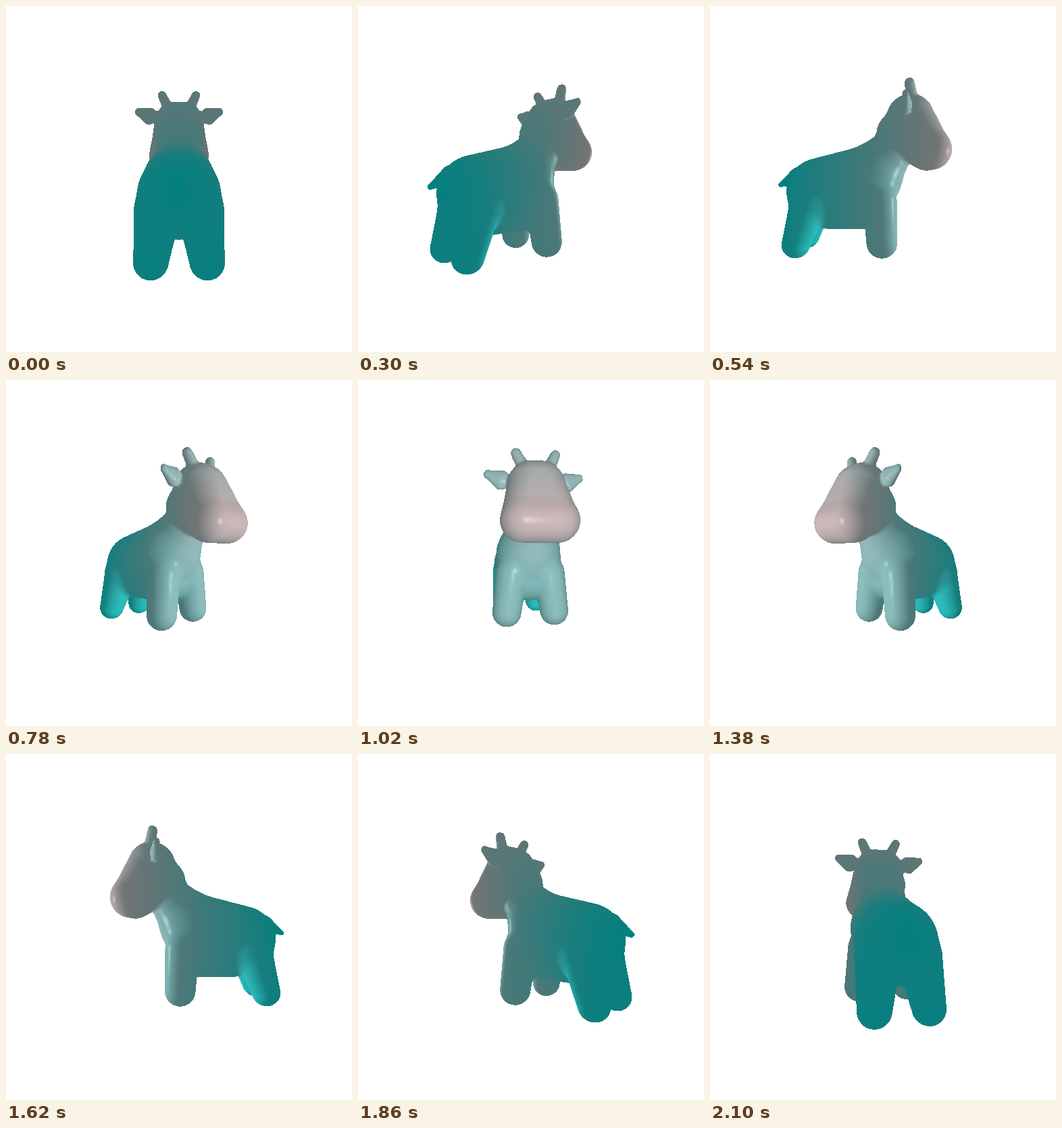
An HTML page with a canvas that plays this animation: 512x512 px, repeating every 2160 ms.

```html
<!DOCTYPE html>
<html lang="en">
<head>
<meta charset="utf-8">
<title>Turning cow</title>
<style>
  html, body { margin: 0; width: 100%; height: 100%; overflow: hidden; background: #fff; }
  canvas { display: block; width: 100vmin; height: 100vmin; }
</style>
</head>
<body>
<canvas id="stage" width="512" height="512"></canvas>
<script>
const SIZE = 512, STEP_MS = 60, STEPS = 36;
const DISTANCE = 3, FOCAL = SIZE / 2 / Math.tan(Math.PI / 6);
const LIGHT_Z = -3, FRONT_Z = -0.66, BACK_Z = 1.05;
const FRONT = [1, 0.9, 0.9], BACK = [0, 1, 1];

// The cow is a soft union of rounded cones, each spanning two balls.
// A ball may be widened sideways; only the right half is described.
const ball = (x, y, z, r, wide = 0) => ({ x, y, z, r, wide });
const cone = (a, b, blend, flat = 1) => ({ a, b, blend, flat });

const shoulders = ball(0, 0.01, 0.14, 0.325);
const rump = ball(0, -0.12, 0.62, 0.33);
const muzzle = ball(0, 0.28, -0.46, 0.182, 0.152);
const crown = ball(0, 0.6, -0.27, 0.235, 0.035);
const nape = ball(0, 0.44, -0.17, 0.235, 0.03);

const body = cone(shoulders, rump, 0);
const belly = cone(ball(0, -0.22, 0.2, 0.28), ball(0, -0.22, 0.5, 0.28), 0.05);
const hindLeg = cone(ball(0.165, -0.25, 0.7, 0.18), ball(0.205, -0.605, 0.81, 0.13), 0.06);
const frontLeg = cone(ball(0.19, -0.2, 0.03, 0.16), ball(0.24, -0.585, 0.01, 0.143), 0.07);
const tail = cone(ball(0, 0.03, 0.87, 0.07), ball(0, -0.06, 1.025, 0.025), 0.05);
const neck = cone(shoulders, ball(0, 0.36, -0.15, 0.19), 0.04);
const face = cone(crown, muzzle, 0.03);
const jaw = cone(nape, muzzle, 0.04);
const ear = cone(ball(0.32, 0.672, -0.2, 0.092), ball(0.43, 0.715, -0.2, 0.042), 0.025, 0.65);
const horn = cone(ball(0.115, 0.77, -0.28, 0.058), ball(0.183, 0.905, -0.25, 0.047), 0.02);
const cow = [body, belly, hindLeg, frontLeg, tail, neck, face, jaw, ear, horn];

const clamp01 = v => Math.max(0, Math.min(1, v));
const lerp = (a, b, t) => a + (b - a) * t;

function coneDistance({ a, b, flat }, x, y, z) {
  const bx = b.x - a.x, by = b.y - a.y, bz = b.z - a.z;
  const px = x - a.x, py = y - a.y, pz = (z - a.z) / flat;
  const t = clamp01((px * bx + py * by + pz * bz) / (bx * bx + by * by + bz * bz));
  const dx = Math.max(Math.abs(px - bx * t) - lerp(a.wide, b.wide, t), 0);
  const dy = py - by * t, dz = pz - bz * t;
  return Math.sqrt(dx * dx + dy * dy + dz * dz) - lerp(a.r, b.r, t);
}

function distance(x, y, z) {
  let d = 9;
  for (const part of cow) {
    const e = coneDistance(part, Math.abs(x), y, z);
    const overlap = Math.max(part.blend - Math.abs(d - e), 0);
    d = Math.min(d, e) - (overlap && overlap * overlap / (4 * part.blend));
  }
  return d;
}

function gradient(x, y, z) {
  const e = 0.006;
  return [
    (distance(x + e, y, z) - distance(x - e, y, z)) / (2 * e),
    (distance(x, y + e, z) - distance(x, y - e, z)) / (2 * e),
    (distance(x, y, z + e) - distance(x, y, z - e)) / (2 * e),
  ];
}

// Surface nets: one vertex per crossed cell, pulled onto the surface.
function buildMesh() {
  const h = 0.022, min = [-0.54, -0.8, -0.76], count = [50, 82, 88];
  const stride = [count[1] * count[2], count[2], 1];
  const field = new Float32Array(count[0] * stride[0]);
  const vertices = [], triangles = [], known = new Map();
  const coords = c => [Math.floor(c / stride[0]), Math.floor(c / stride[1]) % count[1], c % count[2]];

  for (let c = 0; c < field.length; c++) {
    const [i, j, k] = coords(c);
    field[c] = distance(min[0] + i * h, min[1] + j * h, min[2] + k * h);
  }

  function vertex(cell) {
    if (known.has(cell)) return known.get(cell);
    const p = coords(cell).map((n, axis) => min[axis] + (n + 0.5) * h);
    let g;
    for (let pass = 0; pass < 3; pass++) {
      g = gradient(...p);
      const pull = distance(...p) / Math.max(0.2, g[0] ** 2 + g[1] ** 2 + g[2] ** 2);
      g.forEach((v, axis) => p[axis] -= Math.max(-h, Math.min(h, v * pull)));
    }
    g = gradient(...p);
    const length = Math.hypot(...g) || 1;
    known.set(cell, vertices.length);
    return vertices.push({ p, n: g.map(v => v / length) }) - 1;
  }

  for (let c = stride[0]; c < field.length - stride[0]; c++) {
    for (let axis = 0; axis < 3; axis++) {
      if ((field[c] < 0) === (field[c + stride[axis]] < 0)) continue;
      const u = stride[(axis + 1) % 3], v = stride[(axis + 2) % 3];
      const [q, r, s, t] = [c, c - u, c - u - v, c - v].map(vertex);
      triangles.push([q, r, s], [q, s, t]);
    }
  }
  return { vertices, triangles };
}

// Point light in front of the cow: ambient, diffuse and a tight highlight.
function shade({ p, n }, eye) {
  const unit = v => { const l = Math.hypot(...v); return v.map(k => k / l); };
  const dot = (a, b) => a[0] * b[0] + a[1] * b[1] + a[2] * b[2];
  const toLight = unit([-p[0], -p[1], LIGHT_Z - p[2]]);
  const toEye = unit([eye[0] - p[0], -p[1], eye[2] - p[2]]);
  const facing = dot(n, toLight);
  const mirror = 2 * facing * dot(n, toEye) - dot(toLight, toEye);
  const shine = facing > 0 && mirror > 0 ? 0.2 * mirror ** 64 : 0;
  const level = 0.5 + 0.3 * Math.max(0, facing);
  const depth = clamp01((p[2] - FRONT_Z) / (BACK_Z - FRONT_Z));
  return FRONT.map((f, i) => 255 * Math.min(1, level * lerp(f, BACK[i], depth) + shine));
}

const context = document.getElementById("stage").getContext("2d");
const image = context.createImageData(SIZE, SIZE);
const depths = new Float32Array(SIZE * SIZE);
const mesh = buildMesh();

function fillTriangle(a, b, c) {
  const area = (b.x - a.x) * (c.y - a.y) - (b.y - a.y) * (c.x - a.x);
  if (!area) return;
  const left = Math.ceil(Math.min(a.x, b.x, c.x) - 0.5), right = Math.max(a.x, b.x, c.x) - 0.5;
  const top = Math.ceil(Math.min(a.y, b.y, c.y) - 0.5), bottom = Math.max(a.y, b.y, c.y) - 0.5;
  for (let row = top; row <= bottom; row++) {
    for (let col = left; col <= right; col++) {
      const x = col + 0.5, y = row + 0.5;
      const v = ((x - a.x) * (c.y - a.y) - (y - a.y) * (c.x - a.x)) / area;
      const w = ((b.x - a.x) * (y - a.y) - (b.y - a.y) * (x - a.x)) / area;
      const u = 1 - v - w;
      if (Math.min(u, v, w) < -1e-6) continue;
      const near = u * a.near + v * b.near + w * c.near, i = row * SIZE + col;
      if (near <= depths[i]) continue;
      depths[i] = near;
      for (let k = 0; k < 3; k++) {
        image.data[i * 4 + k] = u * a.color[k] + v * b.color[k] + w * c.color[k];
      }
    }
  }
}

function draw(step) {
  const angle = step / STEPS * 2 * Math.PI, sin = Math.sin(angle), cos = Math.cos(angle);
  const eye = [DISTANCE * sin, 0, DISTANCE * cos];
  const points = mesh.vertices.map(vertex => {
    const [x, y, z] = vertex.p, near = 1 / (DISTANCE - x * sin - z * cos);
    return {
      x: SIZE / 2 + FOCAL * (x * cos - z * sin) * near,
      y: SIZE / 2 - FOCAL * y * near,
      near,
      color: shade(vertex, eye),
    };
  });
  image.data.fill(255);
  depths.fill(0);
  for (const [a, b, c] of mesh.triangles) fillTriangle(points[a], points[b], points[c]);
  context.putImageData(image, 0, 0);
}

let shown = -1;
function tick() {
  const step = Math.floor(performance.now() / STEP_MS) % STEPS;
  if (step !== shown) draw(shown = step);
  requestAnimationFrame(tick);
}
tick();
</script>
</body>
</html>
```
